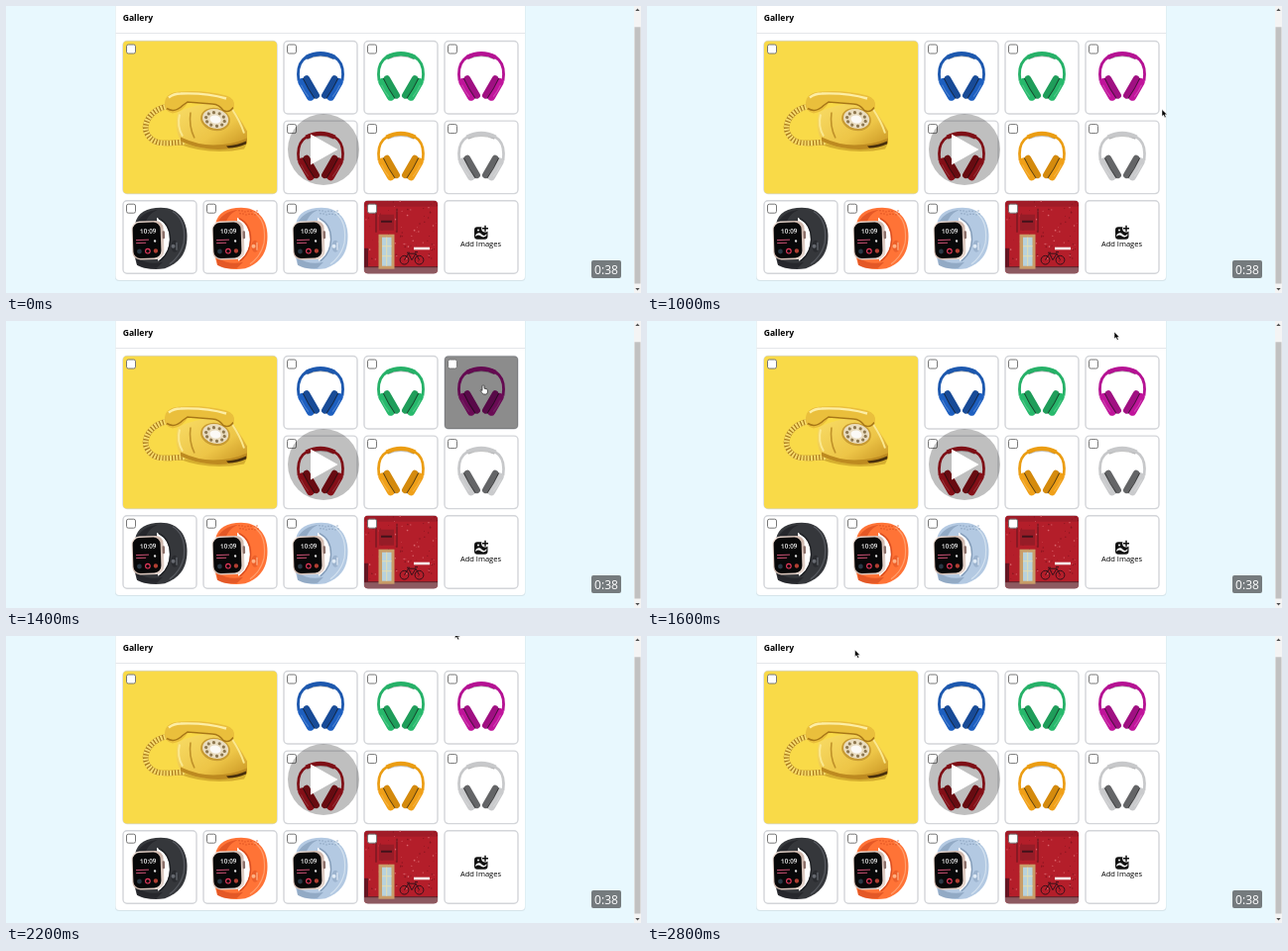
An HTML page that plays this animation: 640x290 px, repeating every 3000 ms.

```html
<!DOCTYPE html>
<html lang="en">
<head>
<meta charset="utf-8">
<title>Gallery</title>
<style>
html, body { margin: 0; width: 100%; height: 100%; overflow: hidden; background: #e8f8fe; }
svg { display: block; width: 640px; height: 290px; }
text { font-family: "Open Sans", "Noto Sans", sans-serif; }
</style>
</head>
<body>
<svg id="stage" viewBox="0 0 640 290">
  <defs>
    <clipPath id="tile"><rect width="74" height="73.5" rx="4"/></clipPath>
    <linearGradient id="body" x2="1" y2="1">
      <stop stop-color="#f8dc66"/><stop offset=".6" stop-color="#edc547"/><stop offset="1" stop-color="#c5901f"/>
    </linearGradient>
    <linearGradient id="metal" x2="1" y2="1">
      <stop stop-color="#f3e4dc"/><stop offset=".5" stop-color="#cdb5aa"/><stop offset="1" stop-color="#eadcd5"/>
    </linearGradient>
  </defs>
  <rect x="110" y="-9" width="413.5" height="287" rx="4" fill="#d6e5ea"/>
  <rect x="110.5" y="-9" width="412.5" height="286" rx="4" fill="#fff"/>
  <path d="M110.5 27.5H523" stroke="#e4e6ea"/>
  <text x="117.7" y="15.4" font-size="8.6" font-weight="700">Gallery</text>
  <g id="tiles"></g>
  <rect id="shade" x="442" y="35.5" width="74" height="73.5" rx="4" opacity=".45"/>
  <g id="boxes"></g>
  <g id="pointer">
    <path id="arrow" d="M0 0V7L1.6 5.6L2.9 8.3L4.2 7.7L3 5.2H5.2Z" stroke="#fff" stroke-width=".5"/>
    <path id="hand" d="M-1 1Q-1-.4 0-.4T1 1V3.2Q4.4 3.2 4.4 5V7Q4 9 2.6 9H.2Q-1 8-3 5.2Q-2.6 4.2-1 5.4Z" fill="#fff" stroke="#222" stroke-width=".7"/>
  </g>
  <circle cx="320" cy="145" r="36" opacity=".25"/>
  <path d="M307 129.5V160.5L334.5 145Z" fill="#fff"/>
  <rect x="590" y="257" width="30" height="18" rx="2" fill="#757b7e"/>
  <text x="605" y="270.6" font-size="12" fill="#fff" text-anchor="middle">0:38</text>
  <rect x="633" width="7" height="290" fill="#f4f4f4"/>
  <rect x="633.5" y="21.3" width="6" height="259.2" fill="#c1c1c1"/>
  <path d="M634.3 5L636.5 2.5L638.7 5ZM634.3 285L636.5 287.5L638.7 285Z" fill="#505050"/>
</svg>
<script>
const $ = id => document.getElementById(id);
const colX = c => 118 + 81 * c, rowY = r => 35.5 + 80.6 * r;
const mirror = s => s + `<g transform="matrix(-1 0 0 1 74 0)">${s}</g>`;

function headphones(band, cup, pad) {
  const side = `<g transform="translate(25 48) rotate(-30)">
    <rect x="-6.5" y="-13" width="8" height="25" rx="4" fill="${cup}"/>
    <rect x="0" y="-13" width="6.5" height="26" rx="3.2" fill="${pad}"/>
    <path d="M.3-12Q-.8 0 .3 12" fill="none" stroke="#111" stroke-width=".9" opacity=".65"/>
    <path d="M-4.6-7Q-5.4 0-4.2 7" fill="none" stroke="#fff" opacity=".22"/></g>`;
  return `<path d="M15 40C12 20 22 13 37 13S62 20 59 40" fill="none" stroke="${band}" stroke-width="2.8"/>
    <path d="M22.5 16.5Q37 9 51.5 16.5" fill="none" stroke="${band}" stroke-width="4.4"/>
    <path d="M24 18.2Q37 12.5 50 18.2" fill="none" stroke="#111" stroke-width=".6" opacity=".4"/>` + mirror(side);
}

function watch(strap, dark, light, holes) {
  let dots = "";
  if (holes) for (let i = 0; i < 14; i++)
    dots += `<circle cx="${36 + i % 7 * 3 + (i > 6 ? 1 : 0)}" cy="${10 + i % 7 * i % 7 * .3 + (i > 6 ? 3 : 0)}" r=".7" fill="${dark}"/>`;
  return `<path d="M12 24C14 12 24 7 38 7C56 7 64.5 20 64.5 36C64.5 53 57 63 42 68.5Q26 71 14 65L11 54Z" fill="${strap}"/>
    <path d="M13 24Q19 11 35 9Q24 14 22 24ZM13 56Q24 66 40 62L34 68Q22 70 14 65Z" fill="${dark}" opacity=".7"/>
    <path d="M34 17Q47 24 47 39T35 61Z" fill="#fff"/>
    <path d="M36 18Q48 24 47.5 40Q47 53 37 61" fill="none" stroke="${dark}" stroke-width="1.4"/>
    <path d="M50 11C60 17 63 28 61 43Q58 56 47 64" fill="none" stroke="${light}" stroke-width="1.2" opacity=".7"/>
    ${dots}<ellipse cx="52" cy="46" rx="3.6" ry="6" fill="${dark}" opacity=".5"/>
    <circle cx="50.5" cy="46" r="2" fill="${light}"/><path d="M54 42v8" stroke="${light}" stroke-width="1.3"/>
    <g transform="rotate(-2 25 39.5)">
    <rect x="9" y="20.5" width="32" height="39" rx="8" fill="url(#metal)"/>
    <rect x="39.8" y="31" width="2.4" height="8" rx="1" fill="#8b706a"/>
    <rect x="10" y="22" width="28" height="36" rx="7" fill="#080809"/>
    <text x="25.5" y="33" font-size="6.4" font-weight="600" fill="#fff" text-anchor="middle">10:09</text>
    <path d="M13 39.5h13M13 42.5h10" stroke="#d9577c" stroke-width=".9"/>
    <circle cx="16" cy="51" r="2.4" fill="#293744"/><circle cx="24.5" cy="51" r="2.3" fill="none" stroke="#e9395e" stroke-width="1.1"/>
    <circle cx="32.5" cy="51" r="2.2" fill="#b13f32"/><circle cx="32" cy="41" r="1.2" fill="#ddd"/></g>`;
}

function wallPhoto() {
  let seed = 7, specks = "";
  const rnd = () => (seed = seed * 16807 % 2147483647) / 2147483647;
  for (let i = 0; i < 110; i++)
    specks += `<circle cx="${rnd() * 74}" cy="${rnd() * 64}" r="${.3 + rnd() * .6}" fill="${i % 3 ? "#8a1520" : "#d9656c"}"/>`;
  return `<g clip-path="url(#tile)"><rect width="74" height="74" fill="#b41e2a"/>
    <path d="M0 0H74V6H0Z" fill="#a01c28"/>${specks}
    <path d="M12 8V32M33 8V32" stroke="#7b1720" stroke-width="1.5"/>
    <rect x="15" y="14" width="15" height="16" fill="#961c27"/><path d="M17 21h11" stroke="#41131b" stroke-width="2"/>
    <path d="M0 67H74V74H0Z" fill="#8d5960"/><path d="M0 67H74" stroke="#5d2028"/>
    <rect x="14.5" y="34" width="16" height="35" fill="#c99d68"/><rect x="18" y="37" width="9.5" height="29" fill="#b8d2dc"/>
    <path d="M22.7 37v29M18 46h9.5M18 56h9.5" stroke="#e4ddb0"/>
    <rect x="50" y="47" width="16" height="2.6" fill="#f5eeee"/>
    <g fill="none" stroke="#351019"><circle cx="40.5" cy="60" r="4.4"/><circle cx="55.5" cy="60" r="4.4"/>
    <path d="M40.5 60L44.5 53.5H52L55.5 60M44.5 53.5L48 60L52 53.5M51 52h3M43 52.5h3"/></g>
    <path d="M0 48V67H4V48Z" fill="#651522"/></g>`;
}

const addIcon = `<rect x="30" y="26.5" width="13.5" height="12.5" rx="3" fill="#111"/>
  <path d="M31.3 34.5Q34.5 31 37.5 34T42.3 33.2V35.4Q39.5 38 36.6 35.8T31.3 36.2Z" fill="#fff"/>
  <circle cx="41" cy="28" r="3.8" fill="#fff"/><path d="M41 25v6M38 28h6" stroke="#111" stroke-width="1.5"/>
  <circle cx="34" cy="29.8" r="1" fill="#fff"/>
  <text x="36.5" y="46.8" font-size="7.5" text-anchor="middle">Add Images</text>`;

function telephone() {
  let holes = "";
  for (let i = 0; i < 10; i++) {
    const a = i * Math.PI / 5;
    holes += `<circle cx="${9.5 * Math.cos(a)}" cy="${6.8 * Math.sin(a)}" r="1.6" fill="#8d7750"/>`;
  }
  const cord = "M46 66C28 68 18 84 25 95S44 103 62 102";
  return `<rect width="155" height="154" rx="4" fill="#f9da48"/>
    <path d="M56 104Q88 116 122 109L125 103Z" fill="#b98a1c" opacity=".55"/>
    <path d="${cord}" fill="none" stroke="#a97818" stroke-width="5.5"/>
    <path d="${cord}" fill="none" stroke="#f7dc6c" stroke-width="5.5" stroke-dasharray="2 1.2"/>
    <path d="M55 72Q78 60 107 64Q116 74 125 91V103Q108 111 88 109Q70 107 58 101Q51 88 55 72Z" fill="url(#body)"/>
    <path d="M58 97Q75 105 91 105Q110 105 125 98V103Q108 111 88 109Q70 107 58 101Z" fill="#bd8a20"/>
    <path d="M104 106Q116 105 124 101V104Q115 108 106 108Z" fill="#49300c"/>
    <path d="M57 74Q54 86 60 96M110 69Q118 81 122 93" fill="none" stroke="#fbe88f" stroke-width="2"/>
    <path d="M68 72Q66 86 72 98" fill="none" stroke="#c0922a" stroke-width="1.6"/>
    <g transform="translate(93 79) rotate(12)"><ellipse rx="15" ry="11.5" fill="#c89b32"/>
    <ellipse cy="-.6" rx="13.2" ry="9.8" fill="#e9dcc0"/>${holes}<ellipse rx="5.6" ry="4" fill="#fbf9f6"/></g>
    <path d="M42 62Q43 52 57 51Q82 49 104 55Q113 58 112 66Q108 73 101 70Q98 64 90 63L66 61Q60 72 50 73Q41 71 42 62Z" fill="#eabf3c"/>
    <path d="M46 57Q51 53 58 53Q84 52 104 58" fill="none" stroke="#fdeea5" stroke-width="2.4"/>
    <path d="M44 68Q52 73 60 65L65 61.5L90 63.5Q97 64 101 70Q107 73 111 67" fill="none" stroke="#a87717" stroke-width="1.5"/>`;
}

function addTile(c, r, art, w = 74, h = 73.5, box = true) {
  const x = colX(c), y = rowY(r);
  $("tiles").innerHTML += `<g transform="translate(${x} ${y})">
    <rect width="${w}" height="${h}" rx="4" fill="#fff" stroke="#d3d5d9" stroke-width="1.4"/>${art}</g>`;
  if (box) $("boxes").innerHTML +=
    `<rect x="${x + 3.5}" y="${y + 3.5}" width="9" height="9" rx="1.8" fill="#fff" stroke="#777"/>`;
}

addTile(0, 0, telephone(), 155, 154);
addTile(2, 0, headphones("#1d58ae", "#1d5fc0", "#184b97"));
addTile(3, 0, headphones("#26b168", "#27b96c", "#1f9d5a"));
addTile(4, 0, headphones("#b51293", "#c0149b", "#a01082"));
addTile(2, 1, headphones("#a8141d", "#b0141e", "#8a0f17"));
addTile(3, 1, headphones("#eb9d13", "#f0a018", "#d48a0d"));
addTile(4, 1, headphones("#c7c8ca", "#c9cacc", "#646567"));
addTile(0, 2, watch("#35373b", "#202226", "#666970"));
addTile(1, 2, watch("#ff7336", "#d94e20", "#ffb184", true));
addTile(2, 2, watch("#b3c9e2", "#859db9", "#e0ebf6", true));
addTile(3, 2, wallPhoto());
addTile(4, 2, addIcon, 74, 73.5, false);

// Pointer path: [start ms, x, y]
const path = [[1000, 519, 104.5], [1200, 496, 82], [1400, 481, 65], [1600, 471, 11],
  [1800, 469.5, 14.5], [2000, 463, 9], [2200, 452.5, -4.5], [2800, 209.5, 14]];

function draw(now) {
  const t = now % 3000;
  const step = path.filter(p => p[0] <= t).pop();
  const hover = t >= 1200 && t < 1600;
  const show = (id, on) => $(id).style.display = on ? "" : "none";
  show("pointer", step);
  show("shade", hover);
  show("hand", hover);
  show("arrow", !hover);
  if (step) $("pointer").setAttribute("transform", `translate(${step[1]} ${step[2]})`);
}

const start = performance.now();
function tick() {
  draw(performance.now() - start);
  requestAnimationFrame(tick);
}
tick();
</script>
</body>
</html>
```
